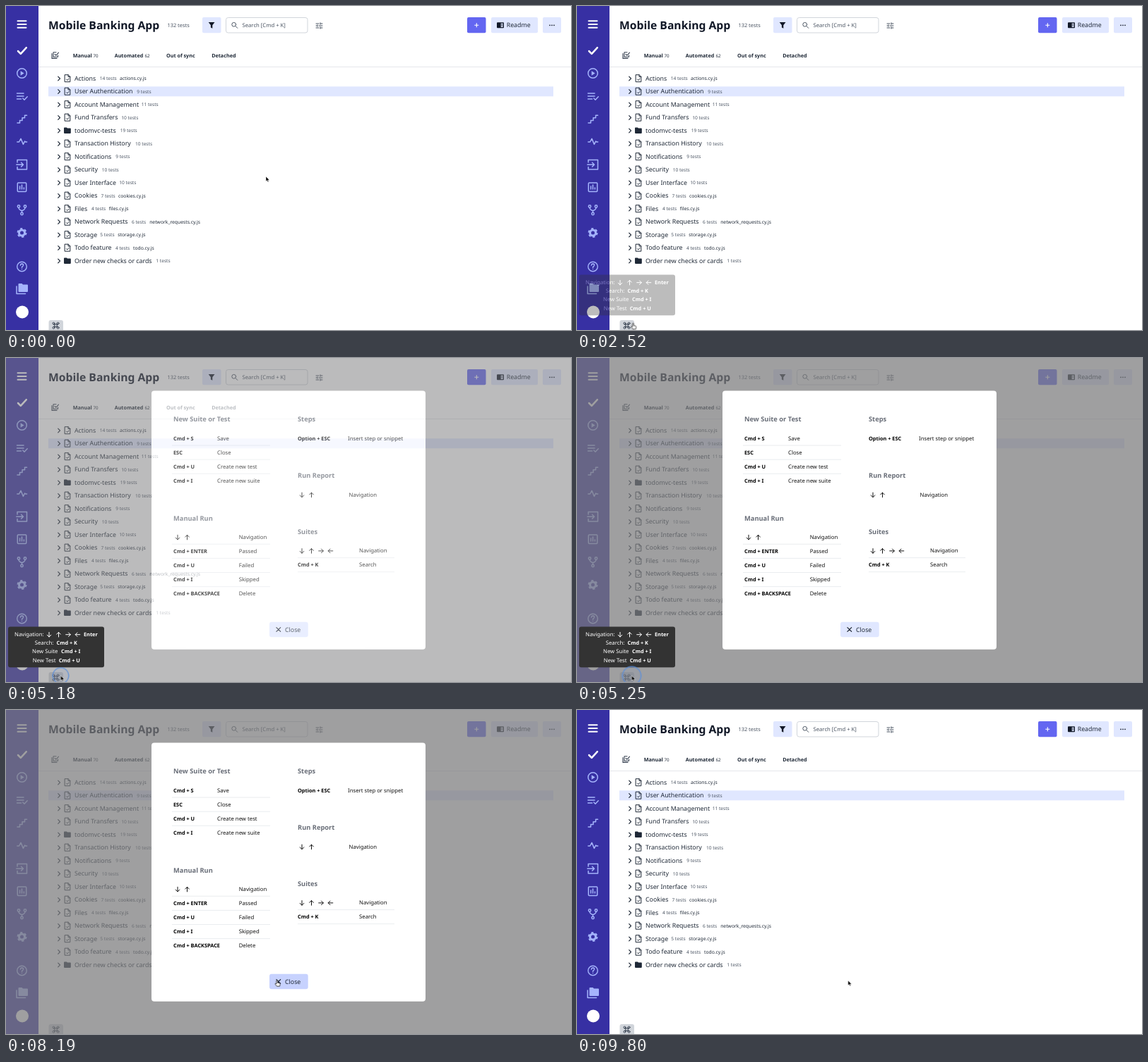
Recreate the animation shown at these times as an HTML page. Size 800 px wide and 460 px high, loop 9870 ms.

```html
<!DOCTYPE html>
<html lang="en">
<head>
<meta charset="utf-8">
<title>Keyboard shortcuts</title>
<style>
html, body { margin: 0; width: 100%; height: 100%; overflow: hidden; background: #fff; }
svg { display: block; width: 800px; height: 460px; }
text { font-family: "Fira Sans", "Noto Sans", "Open Sans", sans-serif; fill: #1f2937; text-rendering: geometricPrecision; white-space: pre; }
.title { font-size: 15.7px; font-weight: 600; fill: #111827; }
.total { font-size: 7.4px; fill: #4b5563; }
.tab { font-size: 7.2px; font-weight: 600; }
.tabnum { font-size: 6.2px; font-weight: 500; }
.search { font-size: 7.7px; fill: #4b5563; }
.btn { font-size: 8.8px; font-weight: 500; }
.name { font-size: 8.8px; }
.count { font-size: 6.6px; fill: #4b5563; }
.file { font-size: 6.75px; }
.head { font-size: 9.3px; font-weight: 700; fill: #696e78; }
.key { font-size: 7.35px; font-weight: 700; fill: #000; }
.val { font-size: 7.75px; fill: #111; }
#tip text { fill: #fff; }
.ln { fill: none; stroke-linecap: round; stroke-linejoin: round; }

.anim { animation: 9870ms linear infinite; }
#cursor { animation-name: travel; }
#arrow { animation-name: arrow; animation-timing-function: step-end; }
#hand { animation-name: hand; animation-timing-function: step-end; }
#tip { animation-name: tip; }
#shade { animation-name: modal; }
#close { animation-name: hover; }
#focus { animation-name: focus; }
#ringA { animation-name: ringA; }
#ringB { animation-name: ringB; }

@keyframes travel {
  0% { transform: translate(368px, 242px); }
  13.2% { transform: translate(368px, 242px); animation-timing-function: ease-in-out; }
  23.5%, 30.5% { transform: translate(79.5px, 450.5px); }
  31.2% { transform: translate(77.5px, 451px); }
  60.2% { transform: translate(77.5px, 451px); animation-timing-function: cubic-bezier(.5, 0, .8, .8); }
  66.67% { transform: translate(325.5px, 382.5px); animation-timing-function: cubic-bezier(.2, .5, .5, 1); }
  70.4%, 100% { transform: translate(383.7px, 384px); }
}
@keyframes arrow { 0%, 52.4%, 97.1%, 100% { opacity: 1; } 23.9%, 70.8% { opacity: 0; } }
@keyframes hand { 0%, 52.4%, 97.1%, 100% { opacity: 0; } 23.9%, 70.8% { opacity: 1; } }
@keyframes tip { 0%, 23.81% { opacity: 0; } 29.08%, 60.99% { opacity: 1; } 64%, 100% { opacity: 0; } }
@keyframes modal { 0%, 51.06% { opacity: 0; } 53.1%, 96.5% { opacity: 1; } 99.1%, 100% { opacity: 0; } }
@keyframes hover { 0%, 70.5% { fill: #e0e7ff; } 73%, 100% { fill: #c7d2fe; } }
@keyframes focus { 0%, 93.62% { opacity: 0; } 95%, 100% { opacity: 1; } }
@keyframes ringA {
  0%, 50.9% { opacity: 0; transform: translate(77.5px, 451px) scale(.6); }
  51.8% { opacity: .8; }
  53.19% { opacity: .75; transform: translate(77.5px, 451px) scale(1.08); }
  55.4%, 100% { opacity: 0; transform: translate(77.5px, 451px) scale(1.15); }
}
@keyframes ringB {
  0%, 93.5% { opacity: 0; transform: translate(383.7px, 384px) scale(.6); }
  94.4% { opacity: 1; }
  95.74% { opacity: 1; transform: translate(383.7px, 384px) scale(.94); }
  97.5%, 100% { opacity: 0; transform: translate(383.7px, 384px) scale(1.1); }
}
</style>
</head>
<body>
<svg viewBox="0 0 800 460">
  <rect width="800" height="460" fill="#fff"/>

  <!-- sidebar -->
  <rect width="46" height="460" fill="#3730a3"/>
  <g class="ln" stroke="#fff">
    <path d="M16.5 21.3h12M16.5 26h12M16.5 30.7h12" stroke-width="2"/>
    <path d="M17 64l3.8 3.8 8-8.6" stroke-width="2.5"/>
  </g>
  <g class="ln" stroke="#a5b4fc" stroke-width="1.5">
    <circle cx="22.5" cy="95.5" r="6.8"/>
    <path d="M15.5 124h9.5M15.5 128h9.5M15.5 132h6M23.8 131l2.2 2.2 4.2-4.4"/>
    <path d="M16 166h3.5v-3.6h3.5v-3.6h3.5v-3.6h3"/>
    <path d="M15.8 193h2.7l2.5-4.6 3.4 8 2.2-4.4 1 1h2"/>
    <path d="M16 222v-3.5h13.5v13.5h-13.5v-3.5M14.8 225.2h9.4M21.5 222.2l3 3-3 3"/>
    <rect x="16.3" y="251" width="12.4" height="12.4" rx="1"/>
    <path d="M19.6 260v-4M22.5 260v-6M25.4 260v-2"/>
    <circle cx="18" cy="284.5" r="1.7"/><circle cx="27" cy="284.5" r="1.7"/><circle cx="22.5" cy="295" r="1.7"/>
    <path d="M18 286.5q.2 2.5 4.5 4.3q4.3-1.8 4.5-4.3M22.5 291v2"/>
    <circle cx="22.5" cy="322" r="4" stroke-width="3"/>
    <circle cx="22.5" cy="322" r="6" stroke-width="2" stroke-linecap="butt" stroke-dasharray="3.14 3.14"/>
    <circle cx="22.5" cy="370" r="6.8" stroke-width="1.4"/>
    <path d="M20.4 368.2q.2-2.2 2.2-2.2 2.1.2 2 2-.2 1.2-1.4 1.9-.7.5-.7 1.5M22.5 373.5v.1" stroke-width="1.4"/>
    <path d="M15 398v10.5h12.5"/>
  </g>
  <path d="M20.6 92.3l5 3.2-5 3.2z" fill="#a5b4fc"/>
  <path d="M17.5 395q0-1 1-1h4l1.5 1.6h6q1 0 1 1v8.4q0 1-1 1h-11.5q-1 0-1-1z" fill="#a5b4fc"/>
  <circle cx="23" cy="434.5" r="9" fill="#fff"/>

  <!-- header -->
  <text class="title" x="60" y="32.7">Mobile Banking App</text>
  <text class="total" x="228.5" y="30">132 tests</text>
  <rect x="278" y="16" width="26.5" height="22.3" rx="2" fill="#e0e7ff"/>
  <path d="M286.7 23h8.8l-3.2 4.3v4.4l-2.4-1.2v-3.2z" fill="#111827"/>
  <rect x="311.5" y="16.5" width="115.5" height="21.5" rx="3" fill="#fff" stroke="#d1d5db"/>
  <g class="ln" stroke="#4b5563">
    <circle cx="322.7" cy="26.3" r="2.9"/><path d="M325 28.6l2.8 2.8"/>
    <path d="M439 25h4M445.5 25h2.5M439 28h1.5M443 28h5M439 31h4M445.5 31h2.5M445 23.8v2.4M441 26.8v2.4M445 29.8v2.4"/>
  </g>
  <text class="search" x="334.5" y="30">Search [Cmd + K]</text>
  <rect x="653" y="16" width="26.5" height="22.3" rx="2" fill="#6366f1"/>
  <path d="M663.3 27.2h6M666.3 24.2v6" stroke="#fff" stroke-width="1.1"/>
  <rect x="687" y="16" width="66" height="22.3" rx="2" fill="#e0e7ff"/>
  <rect x="695" y="23.2" width="10" height="8" rx="1" fill="#111827"/>
  <path d="M700.7 24.5h3v5.5h-3z" fill="#e0e7ff"/>
  <path d="M701 26h2.5M701 28h2.5" stroke="#111827" stroke-width=".7"/>
  <text class="btn" x="708.7" y="30.3">Readme</text>
  <rect x="760" y="16" width="26" height="22.3" rx="2" fill="#e0e7ff"/>
  <path class="ln" d="M770 27.3h.01M773 27.3h.01M776 27.3h.01" stroke="#111827" stroke-width="1.7"/>

  <!-- tabs -->
  <path class="ln" d="M73.5 70v2.3h-6.5v-6.5h4M69.2 68.5l1.7 1.7 3.6-4M65 67.5v6.9h7" stroke="#374151" stroke-width="1.1"/>
  <text class="tab" x="94.7" y="72.8">Manual</text><text class="tabnum" x="123.5" y="72.8">70</text>
  <text class="tab" x="153.7" y="72.8">Automated</text><text class="tabnum" x="196.5" y="72.8">62</text>
  <text class="tab" x="227" y="72.8">Out of sync</text>
  <text class="tab" x="291.2" y="72.8">Detached</text>
  <path d="M46 86.5h754" stroke="#e5e7eb"/>

  <rect x="60" y="114.3" width="715" height="14" fill="#e0e7ff"/>
  <g id="rows"></g>

  <rect x="60.5" y="446" width="20.5" height="18" rx="3" fill="#d1d5db"/>
  <g class="ln" transform="translate(70.5 453.7)" stroke="#374151">
    <path d="M-3.2-1.7h6.4M-3.2 1.7h6.4M-1.7-3.2v6.4M1.7-3.2v6.4"/>
    <circle cx="-3.1" cy="-3.1" r="1.4"/><circle cx="3.1" cy="-3.1" r="1.4"/>
    <circle cx="-3.1" cy="3.1" r="1.4"/><circle cx="3.1" cy="3.1" r="1.4"/>
  </g>

  <!-- shortcuts dialog -->
  <g id="shade" class="anim">
    <rect width="800" height="460" fill="#7b7b7c" fill-opacity=".72"/>
    <rect x="206" y="46.5" width="388" height="367.3" rx="4" fill="#fff"/>
    <g id="keys"></g>
    <rect id="focus" class="anim" x="371.5" y="373.3" width="57.7" height="24.5" rx="4" fill="#fff" stroke="#c7d2fe" stroke-width=".9"/>
    <rect id="close" class="anim" x="373" y="374.8" width="54.7" height="21.5" rx="3"/>
    <path class="ln" d="M382.9 382.6l5.8 5.8M388.7 382.6l-5.8 5.8" stroke="#111827" stroke-width="1.1"/>
    <text class="btn" x="395" y="388.8">Close</text>
  </g>

  <g id="tip" class="anim"><rect x="3" y="381.5" width="136" height="57.7" rx="3" fill="#333"/></g>

  <g fill="#6f93f0" fill-opacity=".4" stroke="#5b8fdc" stroke-width="1.5">
    <circle id="ringA" class="anim" r="12" fill-opacity=".1"/>
    <circle id="ringB" class="anim" r="12"/>
  </g>
  <g id="cursor" class="anim">
    <path id="arrow" class="anim" d="M0 0v7l1.6-1.4 1.1 2.5 1.2-.5-1.1-2.4h2.2z" fill="#000" stroke="#fff" stroke-width=".5"/>
    <path id="hand" class="anim" d="M-.9.7a.9.9 0 0 1 1.8 0v2.6l2.4.5q1.2.3 1 1.6l-.5 2.8h-4.2l-2.2-3q-.3-1.1.8-.9l.9.8z" fill="#fff" stroke="#222" stroke-width=".8"/>
  </g>
</svg>
<script>
const byId = id => document.getElementById(id);
const add = (id, markup) => byId(id).insertAdjacentHTML("beforeend", markup);
const label = (cls, x, y, s) => `<text class="${cls}" x="${x}" y="${y}">${s}</text>`;
const turn = { d: 90, u: -90, r: 0, l: 180 };
const arrows = (dirs, x, y, color) => [...dirs].map((d, i) =>
  `<path class="ln" transform="translate(${x + i * 13.5} ${y}) rotate(${turn[d]})" d="M-3.3 0h6.6M.5-2.8l2.8 2.8-2.8 2.8" stroke="${color}"/>`).join("");
const rule = (x, y, w) => `<path d="M${x} ${y}h${w}" stroke="#e5e7eb" stroke-width=".8"/>`;

// name, tests, x of count, then file and its x; a leading slash marks a folder
const suites = [
  ["Actions", 14, 132.7, "actions.cy.js", 161], ["User Authentication", 9, 185.3],
  ["Account Management", 11, 191.7], ["Fund Transfers", 10, 163.3],
  ["/todomvc-tests", 19, 161.7], ["Transaction History", 10, 183],
  ["Notifications", 9, 155.2], ["Security", 10, 135.7], ["User Interface", 10, 160.3],
  ["Cookies", 7, 134.5, "cookies.cy.js", 159], ["Files", 4, 121, "files.cy.js", 145.7],
  ["Network Requests", 6, 178, "network_requests.cy.js", 203.2],
  ["Storage", 5, 133.3, "storage.cy.js", 158.3],
  ["Todo feature", 4, 155, "todo.cy.js", 180], ["/Order new checks or cards", 1, 212.3]
];
const doc = `<path class="ln" d="M83.5-5h4.7l2.6 2.7v7.3h-7.3zM88-5v2.8h2.8M85.5 1.5l1.3 1.3 2.2-2.5" stroke="#1f2937"/>`;
const folder = `<path d="M82-3.5q0-.8.8-.8h3l1.2 1.2h4q.8 0 .8.8v5.7q0 .8-.8.8h-8.2q-.8 0-.8-.8z" fill="#1f2937"/>`;
suites.forEach(([name, count, x, file, fx], i) => {
  const isFolder = name[0] === "/";
  add("rows", `<g transform="translate(0 ${102.7 + i * 18.5})">
    <path class="ln" d="M73.7-2.6l2.8 2.9-2.8 2.9" stroke="#1f2937" stroke-width="1.15"/>
    ${isFolder ? folder : doc}
    ${label("name", 97, 3.2, isFolder ? name.slice(1) : name)}
    ${label("count", x, 2.5, count + " tests")}
    ${file ? label("file", fx, 2.5, file) : ""}</g>`);
});

// heading, x, y, x of values, rule width, rows of [key or arrows, value]
const groups = [
  ["New Suite or Test", 237, 87, 299, 139, [["Cmd + S", "Save"], ["ESC", "Close"], ["Cmd + U", "Create new test"], ["Cmd + I", "Create new suite"]]],
  ["Manual Run", 237, 227.2, 329.7, 139, [["du", "Navigation"], ["Cmd + ENTER", "Passed"], ["Cmd + U", "Failed"], ["Cmd + I", "Skipped"], ["Cmd + BACKSPACE", "Delete"]]],
  ["Steps", 413, 87, 484, 0, [["Option + ESC", "Insert step or snippet"]]],
  ["Run Report", 413, 167, 485.5, 0, [["du", "Navigation"]]],
  ["Suites", 413, 246.5, 500, 137, [["durl", "Navigation"], ["Cmd + K", "Search"]]]
];
groups.forEach(([head, x, top, vx, width, rows]) => {
  add("keys", label("head", x, top + 3.4, head));
  rows.forEach(([key, value], i) => {
    const y = top + 27.1 + i * 20.1;
    add("keys", (/^[durl]+$/.test(key) ? arrows(key, x + 6, y + .3, "#111") : label("key", x, y + 2.7, key))
      + label("val", vx, y + 2.6, value)
      + (width && i < rows.length - 1 ? rule(x === 237 ? 235 : x, y + 10, width) : ""));
  });
});
add("keys", rule(413, 303.7, 137));

add("tip", label("val", 12, 395, "Navigation:") + arrows("durl", 61, 392.7, "#fff") + label("key", 110, 395, "Enter"));
[["Search:", 40.7, "Cmd + K", 71.5], ["New Suite", 37, "Cmd + I", 78], ["New Test", 37.7, "Cmd + U", 74.7]]
  .forEach(([s, x, key, kx], i) => add("tip", label("val", x, 407.3 + i * 12.1, s) + label("key", kx, 407.3 + i * 12.1, key)));
</script>
</body>
</html>
```
